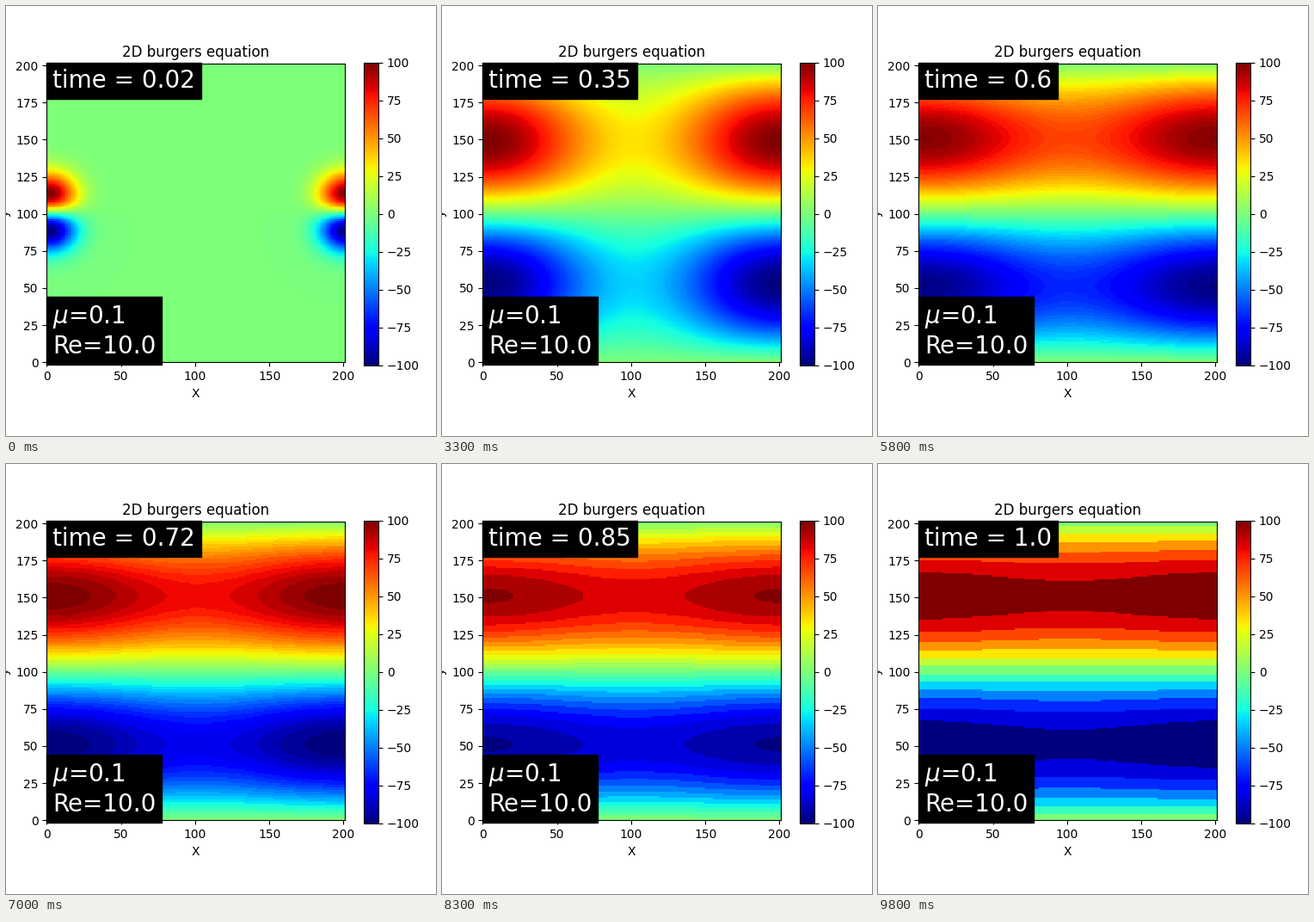
These frames come from a looping animation (500 px wide and 500 px high, 9900 ms). A matplotlib script:

```python
import numpy as np
import matplotlib.pyplot as plt
from matplotlib.animation import FuncAnimation

SIZE = 500
CELLS = 201
PERIOD = 200
MU = 0.1
GAIN = 311.6
FRAMES = 99

plt.rcParams["font.family"] = "DejaVu Sans"

modes = np.arange(1, 25)[:, None]
cell = np.arange(CELLS)
cos_x = np.cos(modes * 2 * np.pi * (cell - 1.5) / PERIOD)
sin_y = np.sin(modes * 2 * np.pi * (cell - 100.5) / PERIOD)


def field(t):
    """Diffusing vortex pair, rounded to whole numbers and scaled to +-100."""
    decay = np.exp(-MU * (2 * np.pi * modes) ** 2 * t)
    along_x = 1 + 2 * (decay * cos_x).sum(axis=0)
    along_y = (modes * decay * sin_y).sum(axis=0)
    u = np.round(GAIN * np.outer(along_y, along_x))
    return 100 * u / np.abs(u).max()


def time_at(i):
    return round(0.02 + 0.01 * i, 2)


def pixel_axes(left, bottom, width, height):
    return fig.add_axes([v / SIZE for v in (left, bottom, width, height)])


def boxed_text(x, y, s):
    return ax.text(x, y, s, transform=ax.transAxes, fontsize=20, color="white",
                   bbox={"facecolor": "black", "pad": 5})


fig = plt.figure(figsize=(5, 5), dpi=100)
ax = pixel_axes(47.2, 85.7, 347, 347)
cax = pixel_axes(415.6, 82.5, 17.6, 352)

image = ax.imshow(field(time_at(0)), cmap="jet", vmin=-100, vmax=100,
                  origin="lower", extent=(0, CELLS, 0, CELLS),
                  interpolation="nearest", aspect="auto")
fig.colorbar(image, cax=cax)
ax.set_title("2D burgers equation")
ax.set_xlabel("X")
ax.set_ylabel("y")
ax.set_xticks(range(0, 201, 50))
ax.set_yticks(range(0, 201, 25))

clock = boxed_text(0.02, 0.92, "")
boxed_text(0.02, 0.03, f"$\\mu$={MU}\nRe={1 / MU}")


def update(i):
    t = time_at(i)
    image.set_data(field(t))
    clock.set_text(f"time = {t}")
    return image, clock


anim = FuncAnimation(fig, update, frames=FRAMES, interval=100,
                     repeat=True, repeat_delay=0, blit=False)
plt.show()
```
